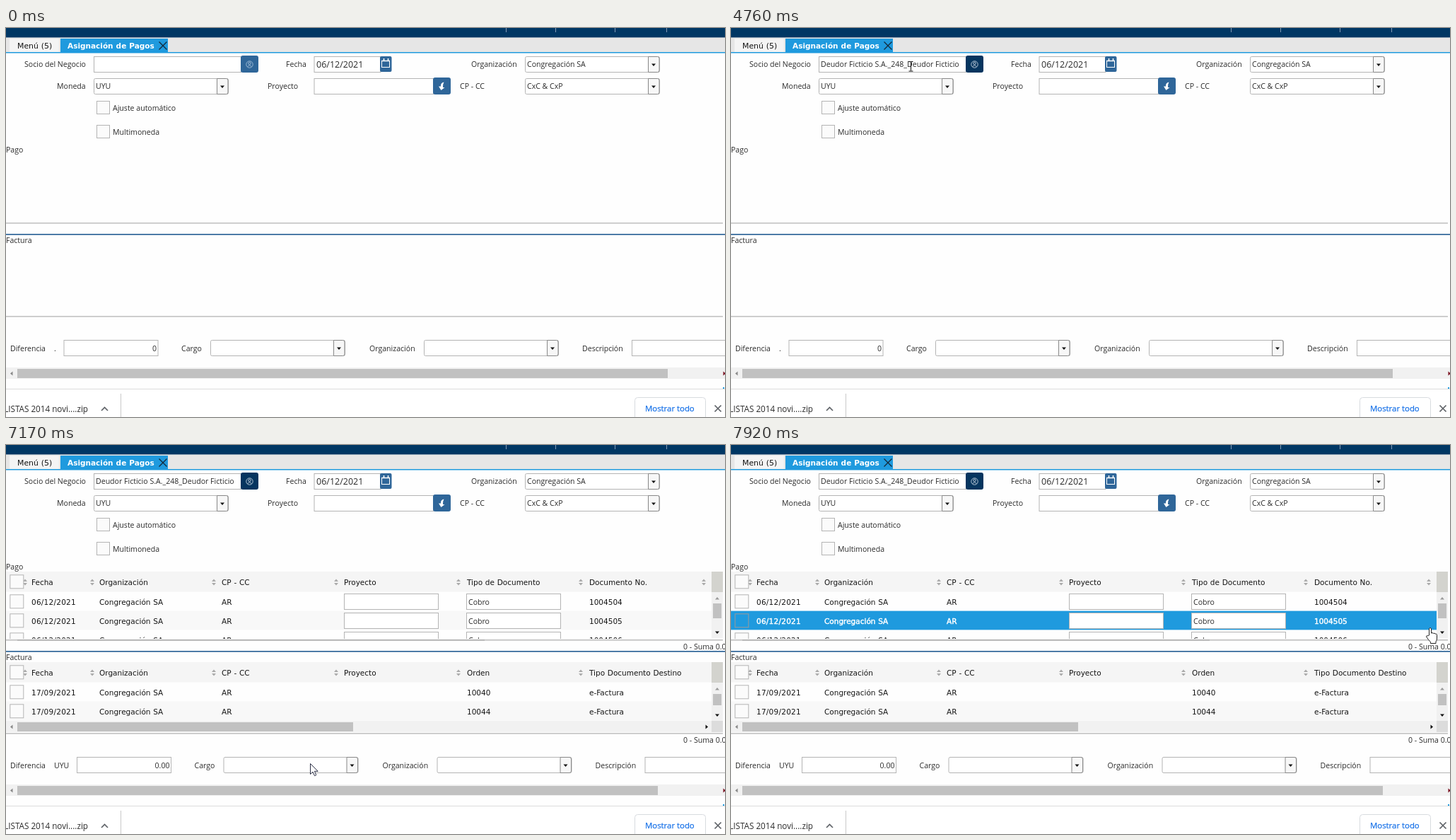
Recreate the animation shown at these times as an HTML page. Size 1017 by 550 pixels, loop 7990 ms.

```html
<!DOCTYPE html>
<html lang="es">
<head>
<meta charset="utf-8">
<title>Asignación de Pagos</title>
<style>
  html, body { margin: 0; width: 100%; height: 100%; overflow: hidden; background: #fefefe; }
  svg { display: block; }
  text { font: 10.57px "Open Sans", sans-serif; fill: #2b2b2b; white-space: pre; }
  text.grid { font: 10.5px "DejaVu Sans", sans-serif; fill: #151515; word-spacing: .4px; }
  text.date { letter-spacing: .24px; }
  .field { fill: #fff; stroke: #b4b4b4; }
  .check { fill: #fbfbfb; stroke: #b4b4b4; }
  .hot .back, .hot .check { fill: #1f9ade; }
  .hot .check { stroke: #9a9a9a; }
  .hot text.grid { fill: #fff; stroke: #fff; stroke-width: .45px; }
</style>
</head>
<body>
<svg id="stage" width="1017" height="550" viewBox="0 0 1017 550"></svg>
<script>
const LOOP = 7990;
const BLUE = '#1f9ade', STEEL = '#2f6699', GREY = '#c1c1c1';
const COMPANY = 'Congregación SA';
const PARTNER = 'Deudor Ficticio S.A._248_Deudor Ficticio';
const COLUMNS = [36, 132, 305, 478, 652, 825];

const rect = (x, y, w, h, fill, extra = '') =>
  `<rect x="${x}" y="${y}" width="${w}" height="${h}" fill="${fill}" ${extra}/>`;
const path = (d, fill, stroke = 'none', extra = '') =>
  `<path d="${d}" fill="${fill}" stroke="${stroke}" ${extra}/>`;
const text = (x, y, s, extra = '') => `<text x="${x}" y="${y}" ${extra}>${s}</text>`;
const grid = (x, y, s, extra = '') =>
  text(x, y, s, `class="grid${s.includes('/') ? ' date' : ''}" ${extra}`);
const group = (id, body, extra = '') => `<g id="${id}" ${extra}>${body}</g>`;
const field = (x, y, w, h = 22) => rect(x + .5, y + .5, w, h, '#fff', 'class="field"');
const check = (x, y, size = 18) => rect(x + .5, y + .5, size, size, '#fff', 'class="check"');
const tableCheck = y => check(5.3, y + 3.3, 19);
const button = (x, y, fill, id = '') => rect(x, y, 25, 24, fill, `rx="3" id="${id}"`);

// Small solid triangle pointing up, down, left or right
const triangle = (x, y, dir, fill = '#111', size = 3) => {
  const angle = { up: 0, right: 90, down: 180, left: 270 }[dir];
  return path(`M${-size} ${size / 2}H${size}L0 ${-size / 2 - .5}Z`, fill, 'none',
    `transform="translate(${x} ${y}) rotate(${angle})"`);
};

const combo = (x, y, value = '') =>
  `<rect class="field" x="${x + .5}" y="${y + .5}" width="190" height="22" rx="2"/>` +
  path(`M${x + 174.5} ${y + .5}h13q2.5 0 2.5 2.5v17q0 2.5 -2.5 2.5h-13z`, '#f7f7f7', '#888') +
  triangle(x + 182, y + 12, 'down') + text(x + 3, y + 15, value);

const cross = (x, y, r, color, width) =>
  path(`M${x - r} ${y - r}L${x + r} ${y + r}M${x + r} ${y - r}L${x - r} ${y + r}`,
    'none', color, `stroke-width="${width}"`);

function header() {
  const notches = [707, 777, 861, 934].map(x => rect(x, 0, 1, 6, '#7f9ab3')).join('');
  return rect(0, 13, 1017, 22, '#e6e6e6') + rect(0, 0, 1017, 13.4, '#003764') + notches +
    rect(0, 34, 1017, 1.5, BLUE) +
    rect(5, 15, 70, 19, '#f4f4f4') + rect(77, 15, 152, 20, BLUE) +
    grid(16, 29, 'Menú (5)', 'style="font-size:10.9px"') +
    grid(87, 29, 'Asignación de Pagos', 'style="font-weight:bold;fill:#fff"') +
    cross(222, 25, 5.5, '#15293a', 1.3);
}

function form() {
  return text(26, 55, 'Socio del Negocio') + text(396, 55, 'Fecha') + text(658, 55, 'Organización') +
    text(72, 86, 'Moneda') + text(370, 86, 'Proyecto') + text(642, 86, 'CP - CC') +
    field(124, 40, 208) +
    group('partner', rect(127, 44, 17, 15, '#0078d7', 'id="selection"') +
      text(127, 55, '', 'id="typed"') + rect(127, 44, 1, 15, '#000', 'id="caret"'),
      'clip-path="url(#partnerClip)"') +
    rect(125, 40, 208, 22, 'none', 'id="ring" stroke="#101010" stroke-width="2" rx="2"') +
    button(332, 39, STEEL, 'lookup') +
    group('lookupIcon', '<circle cx="344.5" cy="51.5" r="4.7"/><circle cx="344.5" cy="50" r="1.7"/>' +
      '<path d="M341.5 55q3 -4.5 6 0"/>', 'fill="none"') +
    field(435.5, 40, 94) + text(439, 56, '06/12/2021', 'style="font-size:12.5px"') +
    rect(529, 40, 16.5, 22, STEEL, 'rx="2"') +
    rect(531.5, 46.5, 11, 9, 'none', 'stroke="#fff"') +
    path('M531 46.5h12M534.5 43v3M540.5 43v3', 'none', '#fff', 'stroke-width="1.5"') +
    combo(734, 40, COMPANY) + combo(124, 71, 'UYU') + combo(734, 71, 'CxC &amp; CxP') +
    field(435.5, 71, 169) + button(604, 70, STEEL) +
    path('M619.5 76.5q-5 1 -4.5 6h-3l3.5 5.5 5 -4h-2.5q-.5 -4 1.500 -7.500z', '#fff') +
    check(128, 103) + text(151, 117, 'Ajuste automático') +
    check(128, 137) + text(151, 151, 'Multimoneda') +
    text(0, 176, 'Pago') + text(0, 304, 'Factura') +
    rect(0, 291, 1017, 1.7, STEEL) + rect(0, 275, 1014, 1.7, '#c6c6c6') + rect(0, 407, 1014, 1.7, '#c6c6c6');
}

function tableHeader(y, titles) {
  const arrows = [27, 122, 294, 467, 640, 813].concat(y < 200 ? 987 : [])
    .map(x => triangle(x, y + 12.5, 'up', '#aaa') + triangle(x, y + 17.5, 'down', '#aaa')).join('');
  return rect(0, y, 998, 29, '#f5f5f5') + rect(998, y, 16, 29, '#d3d3ce') + arrows + tableCheck(y + 1) +
    titles.map((s, i) => grid(COLUMNS[i], y + 19, s)).join('');
}

function row(id, y, cells, shaded, withFields) {
  const fields = withFields
    ? field(478, y + 2, 133) + field(651, y + 2, 133) + text(654, y + 18, 'Cobro') : '';
  return group(id, rect(0, y - .4, 998, 27, shaded ? '#f8f8f8' : '#fefefe', 'class="back"') +
    tableCheck(y) + fields +
    cells.map((s, i) => s && grid(COLUMNS[i], y + 18, s)).join(''));
}

const scrollY = (y, h, thumb, size) => rect(998, y, 16, h, '#f1f1f1') +
  rect(1000, thumb, 12, size, GREY) +
  triangle(1006, y + 9, 'up', '#999') + triangle(1006, y + h - 8, 'down');

function tables() {
  const payment = n => ['06/12/2021', COMPANY, 'AR', '', '', String(1004504 + n)];
  const invoice = order => ['17/09/2021', COMPANY, 'AR', '', order, 'e-Factura'];
  return tableHeader(179, ['Fecha', 'Organización', 'CP - CC', 'Proyecto', 'Tipo de Documento', 'Documento No.']) +
    `<g clip-path="url(#paymentClip)">` +
    [0, 1, 2].map(n => row('payment' + n, 208 + 27 * n, payment(n), n === 1, true)).join('') + '</g>' +
    scrollY(208, 65, 224, 21) + rect(0, 274, 1014, 1, '#f1f1f1') + rect(16, 275, 661, 1.7, '#b5b5b5') +
    text(958, 289, '0 - Suma 0.00') +
    tableHeader(307, ['Fecha', 'Organización', 'CP - CC', 'Proyecto', 'Orden', 'Tipo Documento Destino']) +
    row('invoice0', 336, invoice('10040'), false) + row('invoice1', 363, invoice('10044'), true) +
    scrollY(336, 54, 352, 16) + rect(0, 390, 998, 16, '#f1f1f1') + rect(16, 392, 475, 13, GREY) +
    rect(998, 390, 16, 16, '#dcdcdc') + triangle(8, 398.5, 'left', '#888') + triangle(991, 398.5, 'right') +
    text(958, 421, '0 - Suma 0.00');
}

function totals(id, shift, currency, amount, thumbEnd) {
  const x = v => v + shift;
  return group(id, text(68, 457, currency) + field(x(81.5), 441, 133) +
    text(x(213), 457, amount, 'text-anchor="end"') +
    text(x(248), 457, 'Cargo') + combo(x(289), 441) +
    text(x(514), 457, 'Organización') + combo(x(591), 441) +
    text(x(815), 457, 'Descripción') + field(x(885), 441, 190) +
    rect(0, 480, 1017, 16, '#f1f1f1') + rect(16, 482, thumbEnd - 16, 13, GREY) +
    triangle(8, 488.5, 'left', '#888') + triangle(1016, 488.5, 'right', '#7a1020'));
}

function downloads() {
  return rect(1014, 508, 2, 2, BLUE) + rect(0, 510.5, 1017, 40, '#fff') + rect(0, 510, 1017, 1, '#dcdcdc') +
    text(116, 543, 'LISTAS 2014 novi....zip', 'text-anchor="end" style="font-size:11.7px"') +
    path('M135 541l4.5 -4.5 4.5 4.5', 'none', '#5f6368', 'stroke-width="1.7"') +
    rect(162, 517, 1, 33, '#c9c9c9') +
    rect(889.5, 522.5, 100, 36, '#fff', 'stroke="#d8dbdf" rx="4"') +
    text(904, 542, 'Mostrar todo', 'style="font-size:11.4px;fill:#1a73e8;stroke:#1a73e8;stroke-width:.25px"') +
    cross(1007, 538, 4.5, '#5f6368', 1.7);
}

const cursors =
  group('beam', path('M-3 -6.5h2.5l.5 .5l.5 -.5h2.5M0 -6v12.5M-3 7h6', 'none', '#111')) +
  group('arrow', path('M.5 .5v15l3.5 -3.3l2.5 5.5l2.3 -1l-2.4 -5.4h4.8z', '#fff', '#2b2f45')) +
  group('hand', path('M-1.5 10V.5q1.5 -2 3 0V7q1.5 -1.2 3 .4q1.6 -.8 2.8 .6q2 -.4 2.2 1.5V15' +
    'q-.3 2.5 -1.5 4v2.5h-7.5v-2q-3.5 -3.5 -6 -7.5q.3 -2 2 -1.2z', '#fff', '#222'));

document.getElementById('stage').innerHTML =
  `<defs><clipPath id="partnerClip">${rect(125, 40, 205, 22, '#000')}</clipPath>` +
  `<clipPath id="paymentClip">${rect(0, 207, 998, 67, '#000')}</clipPath></defs>` +
  rect(0, 0, 1017, 550, '#fefefe') + header() + form() + text(6, 457, 'Diferencia') +
  group('tables', tables()) + totals('emptyTotals', 0, '.', '0', 936) +
  totals('loadedTotals', 18.5, 'UYU', '0.00', 922) + downloads() + group('cursor', cursors);

// Pointer moves: start, end, number of steps, evenly timed points
const MOVES = [
  [430, 650, 4, [[1000, 536], [660, 260], [420, 95], [375, 89]]],
  [1050, 1540, 8, [[371, 88], [325, 74], [280, 60], [260, 55], [254, 54]]],
  [6620, 6900, 5, [[238, 110], [190, 216], [150, 294], [142, 400], [165, 490]]],
  [7170, 7920, 12, [[430, 450], [770, 350], [923, 329], [950, 296], [964, 278], [972, 268],
    [978, 261], [983, 260], [986, 259], [988, 259], [989, 259], [989, 259]]],
];
const HOVERS = [['payment0', 6690, 6830], ['invoice0', 7240, 7380], ['payment1', 7510, LOOP]];
const el = id => document.getElementById(id);
const within = (t, from, to) => t >= from && t < to;
const show = (id, on) => { el(id).style.display = on ? '' : 'none'; };

function pointerAt(t) {
  const move = MOVES.findLast(m => t >= m[0]);
  if (!move) return null;
  const [from, to, steps, points] = move;
  const done = Math.min(1, Math.floor((t - from) / (to - from) * (steps - 1) + .05) / (steps - 1));
  const at = done * (points.length - 1), i = Math.min(Math.floor(at), points.length - 2);
  return [0, 1].map(k => points[i][k] + (points[i + 1][k] - points[i][k]) * (at - i));
}

function pointerKind([x, y]) {
  if (y < 95 && (x < 332 || x > 368)) return 'beam';
  return within(y, 208, 274) || within(y, 336, 390) ? 'hand' : 'arrow';
}

function typedAt(t) {
  if (t >= 4760) return PARTNER;
  return 'clie'.slice(0, t < 3060 ? 0 : t < 3310 ? 2 : t < 3460 ? 3 : 4);
}

function draw(t) {
  const chosen = t >= 4760, loaded = t >= 5590, selected = within(t, 4500, 4760);
  show('tables', loaded);
  show('loadedTotals', loaded);
  show('emptyTotals', !loaded);
  show('ring', within(t, 1880, 4760));
  show('selection', selected);
  show('caret', within(t, 1980, 2500) || within(t, 3060, 3980));
  el('typed').textContent = typedAt(t);
  el('typed').style.fill = selected ? '#fff' : '';
  el('caret').setAttribute('x', 127 + Math.round(el('typed').getComputedTextLength()));
  el('lookup').setAttribute('fill', chosen ? '#06355f' : STEEL);
  el('lookupIcon').setAttribute('stroke', chosen ? '#b9c9d8' : '#9dbad5');
  for (const [id, from, to] of HOVERS) el(id).classList.toggle('hot', within(t, from, to));

  const pointer = pointerAt(t);
  show('cursor', pointer);
  if (!pointer) return;
  const kind = pointerKind(pointer);
  for (const id of ['beam', 'arrow', 'hand']) show(id, id === kind);
  const [x, y] = pointer.map(Math.round);
  el('cursor').setAttribute('transform', `translate(${x + (kind === 'beam' ? .5 : 0)} ${y})`);
}

function frame() {
  draw(performance.now() % LOOP);
  requestAnimationFrame(frame);
}
frame();
</script>
</body>
</html>
```
